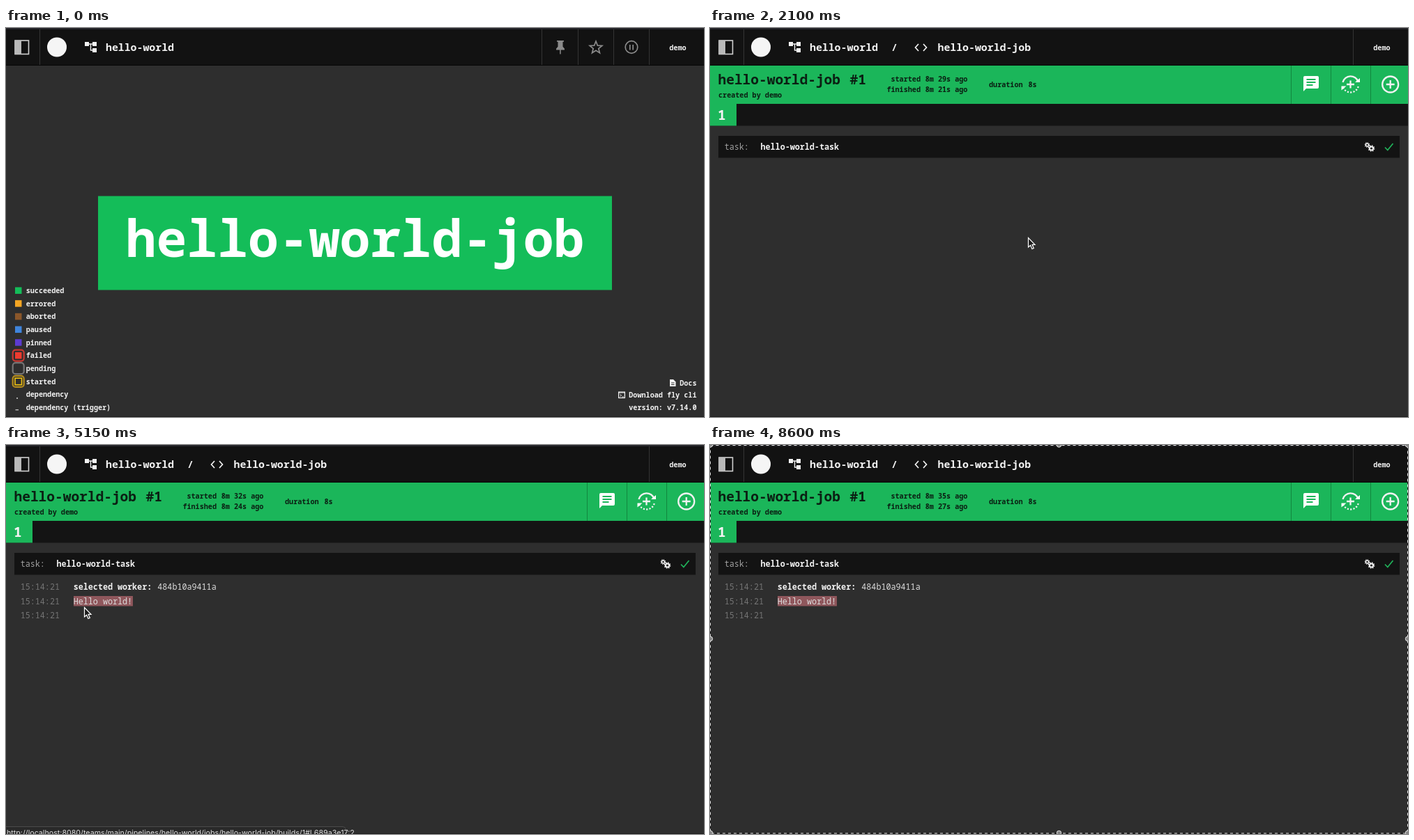
Recreate the animation shown at these times as an HTML page. Size 1001 px wide and 559 px high, loop 9 s.

```html
<!DOCTYPE html>
<html lang="en">
<head>
<meta charset="utf-8">
<title>hello-world</title>
<style>
html, body { margin: 0; width: 100%; height: 100%; overflow: hidden; background: #2e2e2e; }
svg { display: block; width: 100vw; height: 100vh; }
text { font-family: "Noto Sans Mono", "DejaVu Sans Mono", monospace; font-weight: 600; fill: #f2f2f2; white-space: pre; }
.s { font-size: 10.13px; }
.m { font-size: 11.72px; }
.h { font-size: 14.85px; }
.ink text, text.ink { fill: #0b1f13; }
.dim { fill: #747474; font-weight: 400; }
.thin { font-weight: 400; fill: #dcdcdc; }
.end { text-anchor: end; }
.line { fill: none; stroke: #f2f2f2; }
.grey { fill: none; stroke: #8b8b8b; stroke-width: 1.7; }
</style>
</head>
<body>
<svg viewBox="0 0 1001 559" preserveAspectRatio="none">
  <rect width="1001" height="559" fill="#2e2e2e"/>
  <rect width="1001" height="2" fill="#26262b"/>
  <rect y="2" width="1001" height="51" fill="#121212"/>
  <rect y="53" width="1001" height="1" fill="#060606"/>
  <path d="M48.5 2V53M922.5 2V53" stroke="#343434"/>
  <rect x="13" y="18" width="19.5" height="19.5" fill="#111" stroke="#d0d0d0" stroke-width="1.6"/>
  <rect x="13" y="18" width="9" height="19.5" fill="#b9b9b9"/>
  <circle cx="73" cy="27.5" r="14" fill="#f5f5f5"/>
  <path d="M113 20h6v6h-6zM124 20h6v6h-6zM124 29h6v6h-6z" fill="#f2f2f2"/>
  <path class="line" d="M119 23H124M121.5 23V32H124" stroke-width="1.4"/>
  <text class="h" x="143" y="33">hello-world</text>
  <text class="s" x="951.3" y="32">demo</text>

  <g id="pipeline">
    <path d="M768.5 2V53M820.5 2V53M871.5 2V53" stroke="#343434"/>
    <path d="M790 18h10v1.8h-1.5v7l2.5 3v1.7h-5.3v6h-1.5v-6H789v-1.7l2.5-3v-7H790z" fill="#8b8b8b"/>
    <path id="star" class="grey"/>
    <circle class="grey" cx="897" cy="27.5" r="8.8"/>
    <path class="grey" d="M894.8 24V31.5M899.2 24V31.5"/>
    <rect x="132" y="241.5" width="737" height="135" fill="#14bd59"/>
    <text x="500.5" y="329" text-anchor="middle" font-size="73.1" style="fill:#fff">hello-world-job</text>
    <g id="legend"></g>
    <rect x="15" y="531" width="2" height="2" fill="#aaa"/>
    <rect x="13.5" y="548" width="4.5" height="1.4" fill="#bbb"/>
    <path d="M952 505h5l3.5 3.5V515H952z" fill="#f2f2f2"/>
    <path d="M954 510h4.500M954 512.500h4.500" stroke="#2e2e2e"/>
    <rect class="line" x="878.600" y="523.100" width="8.800" height="8.400" stroke-width="1.200"/>
    <path class="line" d="M878.500 524H888M880.500 526.200L882.500 528L880.500 529.800M883.500 530H886"/>
    <text class="s end" x="990.500" y="513.500">Docs</text>
    <text class="s end" x="990.500" y="531">Download fly cli</text>
    <text class="s end" x="990.500" y="549">version: v7.14.0</text>
  </g>

  <g id="build">
    <text class="h" x="260" y="33">/</text>
    <path class="line" d="M299 23L294.500 28L299 33M306 23L310.500 28L306 33" stroke-width="1.700"/>
    <text class="h" x="326.500" y="33">hello-world-job</text>
    <rect y="54" width="1001" height="55" fill="#1bb65a"/>
    <path d="M833.500 54V109M890.500 54V109M947.500 54V109" stroke="#12873f"/>
    <g class="ink">
      <text x="11.500" y="81" font-size="19.500">hello-world-job</text>
      <text x="200.500" y="81" font-size="19.500">#1</text>
      <text class="s" x="12" y="100">created by demo</text>
      <text class="s end" x="302" y="77">started</text>
      <text class="s end" x="302" y="92">finished</text>
      <text class="s" x="308.700" y="77" id="started"></text>
      <text class="s" x="308.700" y="92" id="finished"></text>
      <text class="s" x="400" y="85">duration</text>
      <text class="s" x="456.500" y="85">8s</text>
    </g>
    <path d="M853 69H871Q873 69 873 71V85Q873 87 871 87H855L851 91V71Q851 69 853 69Z" fill="#fff"/>
    <path d="M855.500 74H868.500M855.500 78H868.500M855.500 82H864.500" stroke="#1bb65a" stroke-width="2"/>
    <g class="line" stroke-width="2.300">
      <path d="M907.500 78A11.500 11.500 0 0 1 929.500 77"/>
      <path d="M929.700 84A11.500 11.500 0 0 1 907.500 84" stroke-dasharray="2.200 2.200"/>
      <path d="M918.500 75.500V86.500M913 81H924"/>
      <circle cx="975.700" cy="81" r="11.500"/>
      <path d="M975.700 75V87M969.700 81H981.700"/>
    </g>
    <path d="M925 78h7v-6zM912.500 83.500h-7v6z" fill="#fff"/>
    <rect y="109" width="1001" height="31.500" fill="#141414"/>
    <rect y="109" width="38" height="31.500" fill="#1bb65a"/>
    <text x="11" y="132" font-size="19.500">1</text>
    <rect x="12" y="155" width="977" height="31.500" fill="#131313"/>
    <text class="m" x="20.700" y="175" style="fill:#a2a2a2;font-weight:500">task:</text>
    <text class="m" x="72.500" y="175">hello-world-task</text>
    <g class="line">
      <circle cx="942.500" cy="168" r="2" stroke-width="1.500"/>
      <circle cx="942.500" cy="168" r="3.200" stroke-width="1.200" stroke-dasharray="1.250 1.250"/>
      <circle cx="948.500" cy="173" r="2.600" stroke-width="2"/>
      <circle cx="948.500" cy="173" r="4" stroke-width="1.600" stroke-dasharray="1.570 1.570"/>
    </g>
    <path d="M968 171.500L971.800 175.500L979.500 166" fill="none" stroke="#20b25a" stroke-width="1.700"/>
    <g id="log">
      <rect id="mark" y="217" height="14.500" fill="#8f575c"/>
      <text class="m dim" x="20.700" y="208">15:14:21</text>
      <text class="m dim" x="20.700" y="228.500">15:14:21</text>
      <text class="m dim" x="20.700" y="249">15:14:21</text>
      <text class="m" x="96.700" y="208">selected worker:</text>
      <text class="m thin" x="217.300" y="208">484b10a9411a</text>
      <text class="m thin" x="96.700" y="228.500">Hello world!</text>
    </g>
  </g>

  <rect y="558" width="1001" height="1" fill="#1d1d1d"/>
  <g id="status">
    <path d="M-1 548.500H483Q487 548.500 487 552.500V560H-1Z" fill="#292929" stroke="#4b4b4b"/>
    <text x="1" y="561" font-size="10.700" style="font-family:Inter,'Open Sans',sans-serif;font-weight:400;fill:#dedede">http://localhost:8080/teams/main/pipelines/hello-world/jobs/hello-world-job/builds/1#L689a3e17:2</text>
  </g>
  <g id="crop">
    <rect x=".500" y=".500" width="1000" height="557.500" fill="none" stroke="#161616"/>
    <rect x=".500" y=".500" width="1000" height="557.500" fill="none" stroke="#e2e2e2" stroke-dasharray="4 4"/>
    <g id="knobs" fill="#858585" stroke="#e8e8e8"></g>
  </g>
  <g id="cursor">
    <path id="arrow" d="M.500 .500V14L3.600 11.200L5.900 16.500L8.300 15.400L6 10.300H10Z" fill="#1a1a1a" stroke="#fff" stroke-width="1.200"/>
    <path id="hand" d="M2.200 7.500L.400 2Q.300 .300 1.800 .300Q2.900 .400 3.300 1.700L4.300 4.500Q5.300 3.700 6.300 4.700Q7.400 4 8.300 5.200Q10 4.900 10.300 6.700L10.600 10L9.500 13.500H4.500L.400 9.200Q-.500 7.600 .800 7.200Z" fill="#fff" stroke="#111"/>
  </g>
</svg>
<script>
const $ = id => document.getElementById(id);
const show = (id, on) => $(id).style.display = on ? '' : 'none';
const LOOP = 9000, STEP = 50, OPENED = 1750, EXPANDED = 3000, CROPPED = 8000;

// label, fill, ring
const states = [
  ['succeeded', '#14bd59'], ['errored', '#f5a623'], ['aborted', '#8b572a'],
  ['paused', '#3f85dd'], ['pinned', '#5c3bd1'], ['failed', '#ee3b2f', '#c93832'],
  ['pending', '#2e2e2e', '#747474'], ['started', '#2e2e2e', '#b48c1e'],
  ['dependency'], ['dependency (trigger)']
];
$('legend').innerHTML = states.map(([label, fill, ring], i) => {
  const y = 377 + i * 18.67;
  const core = label === 'started' ? ' stroke="#f1c40f" stroke-width="1.6"' : '';
  return (ring ? `<rect class="ring" data-y="${y}" fill="none" stroke="${ring}" stroke-width="2.2" rx="4"/>` : '') +
    (fill ? `<rect x="13" y="${y - 4.5}" width="9.5" height="9.5" fill="${fill}"${core}/>` : '') +
    `<text class="s" x="28.700" y="${y + 4}">${label}</text>`;
}).join('');
const rings = [...document.querySelectorAll('.ring')];

const tips = Array.from({ length: 10 }, (_, i) => {
  const a = i * Math.PI / 5, r = i % 2 ? 4 : 9.3;
  return `${846 + r * Math.sin(a)} ${28.3 - r * Math.cos(a)}`;
});
$('star').setAttribute('d', `M${tips.join('L')}Z`);

for (const x of [0.5, 500.5, 1000.5]) for (const y of [0, 278.5, 557.5])
  if (x !== 500.5 || y !== 278.5) $('knobs').innerHTML += `<circle cx="${x}" cy="${y}" r="3.200"/>`;

// time, x, y of the pointer tip
const path = [
  [50, 560, 29], [950, 456, 287], [1100, 456, 288], [1750, 456, 291], [2100, 456, 301],
  [2750, 970, 168], [3300, 971, 171], [3500, 971, 171], [3900, 109, 222], [4100, 197, 226],
  [4250, 197, 226], [4800, 72, 225], [5150, 112, 233], [6000, 251, 241],
  [6500, 251, 241], [6800, 239, 510]
];
function pointer(t) {
  const i = path.findIndex(p => p[0] > t);
  const [t0, x0, y0] = path[i - 1], [t1, x1, y1] = path[i];
  const k = (t - t0) / (t1 - t0), e = k * k * (3 - 2 * k);
  return [x0 + (x1 - x0) * e, y0 + (y1 - y0) * e];
}

function draw(t) {
  const first = t < OPENED;
  show('pipeline', first);
  show('build', !first);
  show('log', t >= EXPANDED);
  show('crop', t >= CROPPED);

  const pulse = Math.sin(Math.PI * t / 1100) ** 2;
  for (const r of rings) {
    const half = 8 + 1.6 * pulse;
    r.setAttribute('x', 17.7 - half);
    r.setAttribute('y', r.dataset.y - half + 0.2);
    r.setAttribute('width', half * 2);
    r.setAttribute('height', half * 2);
    r.style.opacity = 1 - 0.6 * pulse;
  }

  const sec = Math.min(35, 27 + Math.floor(t / 1000));
  $('started').textContent = `8m ${sec}s ago`;
  $('finished').textContent = `8m ${sec - 8}s ago`;

  const seen = t >= 50 && t < 6800;
  show('cursor', seen);
  const [x, y] = seen ? pointer(t) : [0, 0];
  $('cursor').setAttribute('transform', `translate(${x} ${y})`);
  show('hand', first && y > 241);
  show('arrow', !first || y <= 241);

  // the selection grows leftwards, letter by letter
  const adv = 7.08, left = t >= 4800 ? 0 : Math.max(0, Math.min(12, Math.round((x - 97) / adv)));
  $('mark').setAttribute('x', 97 + left * adv);
  $('mark').setAttribute('width', t < 4300 ? 0 : (12 - left) * adv);

  $('status').style.opacity = t < 4800 ? 0 : Math.min(1, Math.max(0, (5400 - t) / 200));
}

function tick(now) {
  draw(Math.floor(now % LOOP / STEP) * STEP);
  requestAnimationFrame(tick);
}
draw(0);
requestAnimationFrame(tick);
</script>
</body>
</html>
```
